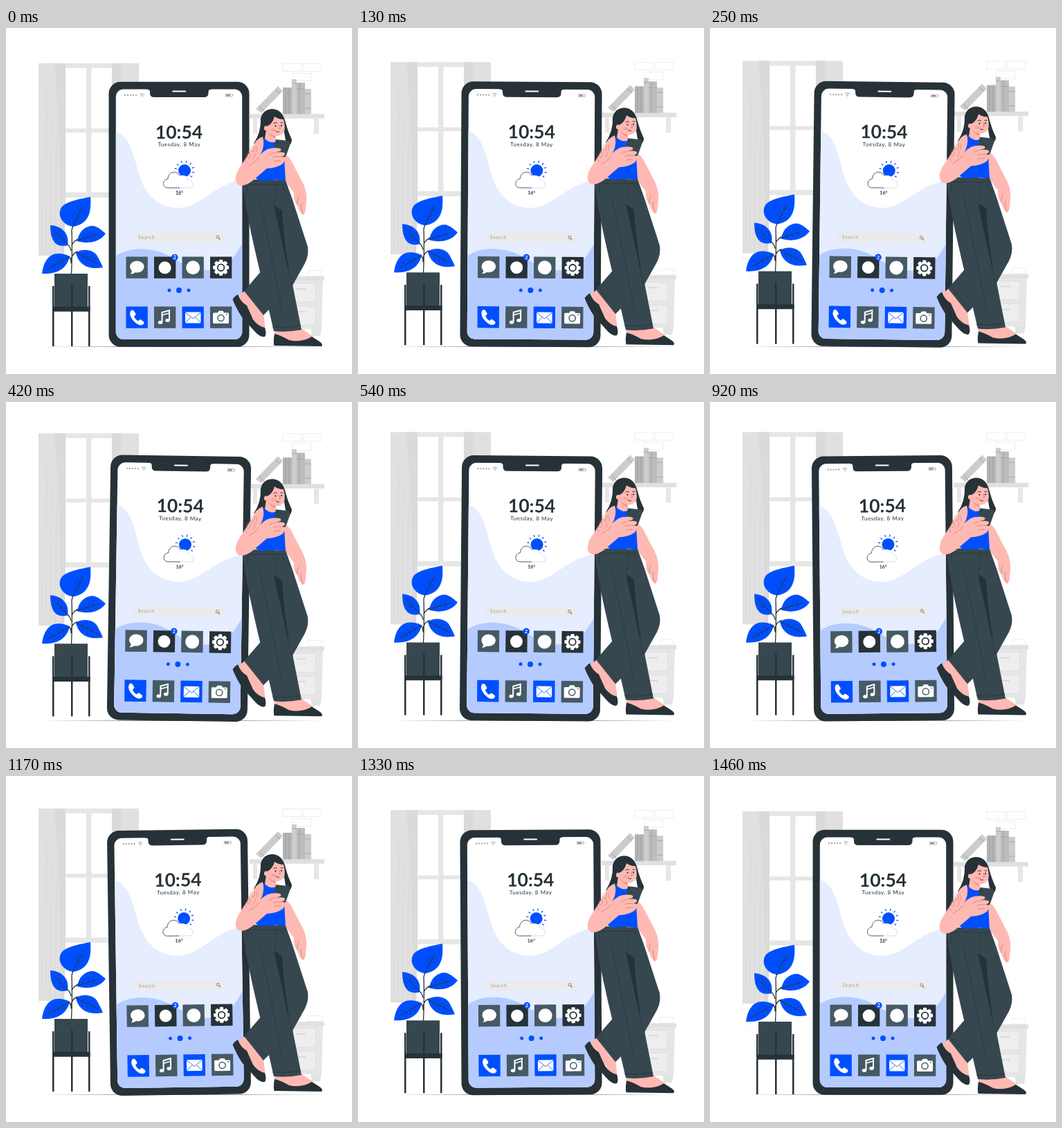
An HTML page with a canvas for the animation above (1500 ms loop, 500 px wide and 500 px high).

```html
<!DOCTYPE html>
<html lang="en">
<head>
<meta charset="utf-8">
<title>Leaning on a phone</title>
<style>
html, body { margin: 0; width: 100%; height: 100%; overflow: hidden; background: #fff; }
canvas { display: block; width: 500px; height: 500px; }
</style>
</head>
<body>
<canvas id="stage" width="500" height="500"></canvas>
<script>
const ctx = document.getElementById('stage').getContext('2d');
const INK = '#263238', SLATE = '#37474f', STEEL = '#455a64', BLUE = '#004fff', SKIN = '#ffb9b3', RED = '#b86b66';

function fill(color, d) {
  ctx.fillStyle = color;
  ctx.fill(new Path2D(d));
}
function line(color, width, d) {
  ctx.strokeStyle = color;
  ctx.lineWidth = width;
  ctx.stroke(new Path2D(d));
}
function box(color, x, y, w, h, r = 0) {
  ctx.fillStyle = color;
  ctx.beginPath();
  ctx.roundRect(x, y, w, h, r);
  ctx.fill();
}
function frame(color, width, x, y, w, h) {
  ctx.strokeStyle = color;
  ctx.lineWidth = width;
  ctx.strokeRect(x, y, w, h);
}
function disc(color, x, y, r, ry = r) {
  ctx.fillStyle = color;
  ctx.beginPath();
  ctx.ellipse(x, y, r, ry, 0, 0, 7);
  ctx.fill();
}
function ring(color, width, x, y, r) {
  ctx.strokeStyle = color;
  ctx.lineWidth = width;
  ctx.beginPath();
  ctx.arc(x, y, r, 0, 7);
  ctx.stroke();
}
function label(text, x, y, font, color, spacing = 0, align = 'left') {
  ctx.font = font + ' Lato, sans-serif';
  ctx.fillStyle = color;
  ctx.letterSpacing = spacing + 'px';
  ctx.textAlign = align;
  ctx.fillText(text, x, y);
  ctx.letterSpacing = '0px';
}
function shifted(dy, draw) {
  ctx.save();
  ctx.translate(0, dy);
  draw();
  ctx.restore();
}

function drawWindow() {
  box('#e6e6e6', 86, 51, 68, 7);
  box('#e6e6e6', 116, 51, 7.5, 192);
  box('#e6e6e6', 84, 145.3, 70, 5.7);
  box('#e6e6e6', 84, 237.5, 70, 7.5);
  fill('#e0e0e0', 'M47 51H86V240L84 329H47Z');
  fill('#dadada', 'M70 51H86V240L84 329H79Q80 180 70 51Z');
  box('#e0e0e0', 153, 51, 39, 180);
  fill('#dadada', 'M153 51H167Q165 140 158 230H153Z');
  line('#d0d0d0', .5, 'M54 160L52 328M60 90L57 328M66 130L64 328M73 150L71 328');
  frame('#eeeeee', .7, 57, 354, 25, 8);
}

function drawShelf() {
  for (const [x, y] of [[400, 51.5], [429, 51.5], [414, 65.5]]) frame('#e6e6e6', .7, x, y, 27, 11);
  box('#e6e6e6', 357, 131, 6, 22);
  box('#e6e6e6', 445, 131, 7, 22);
  box('#e0e0e0', 352, 124.3, 108, 6.5);
  fill('#cccccc', 'M361 117L393 84L400 91L369 123Z');
  line('#b0b0b0', 1.2, 'M366 113L373 120M389 89L396 95');
  box('#b3b3b3', 400, 86, 13, 38.5);
  box('#cccccc', 413, 74, 7, 50.5);
  box('#bdbdbd', 420, 79, 12, 45.5);
  box('#cccccc', 432, 88, 9, 36.5);
  line('#a0a0a0', .8, 'M404 86V124M409 86V124M413 80H420M424 79V124M420 88H432M432 95H441M432 116H441');
}

function drawCabinet() {
  frame('#e6e6e6', .7, 437, 350.5, 19, 8);
  fill('#e3e3e3', 'M440 433H456L454 445H442Z');
  fill('#e6e6e6', 'M385 364H458L456 435H385Z');
  box('#e0e0e0', 383, 359, 77, 6);
  for (const y of [369, 402]) {
    fill('#eeeeee', `M404 ${y}H448L447 ${y + 27}H404Z`);
    line('#d8d8d8', .7, `M404 ${y}H448L447 ${y + 27}H404`);
    line('#d0d0d0', 1.3, `M420 ${y + 8}H433`);
  }
}

// Outline plus a midrib from base to tip, with short forward-leaning veins
function leaf(outline, x0, y0, x1, y1) {
  fill(BLUE, outline);
  ctx.save();
  ctx.translate(x0, y0);
  ctx.rotate(Math.atan2(y1 - y0, x1 - x0));
  const len = Math.hypot(x1 - x0, y1 - y0);
  line(INK, .8, `M-2 0H${len * .9}`);
  let veins = '';
  for (let x = len * .2; x < len * .7; x += len * .2) veins += `M${x + 6} -7L${x} 0L${x + 6} 7`;
  line(INK, .35, veins);
  ctx.restore();
}

function drawPlant() {
  line(INK, 1.3, 'M94.5 356Q96 322 95 292L97 285M95 314Q98 307 106 304M94 322Q93 316 88 312M94 334Q96 325 104 323M94 340Q95 330 86 330');
  leaf('M97 287C78 284 73 266 82 257C92 249 108 247 122 244C123 258 124 283 97 287Z', 97, 286, 113, 254);
  leaf('M103 308C105 293 116 285 127 286C134 288 139 293 144 297C138 306 124 314 103 308Z', 103, 307, 138, 296);
  leaf('M89 314C72 318 64 308 64 285C80 286 92 296 89 314Z', 89, 313, 67, 290);
  leaf('M101 325C108 319 124 319 131 328C135 335 138 341 140 346C124 349 106 346 101 325Z', 102, 325, 137, 343);
  leaf('M52 355C54 338 62 326 75 326C83 326 88 328 92 330C88 348 74 356 52 355Z', 91, 331, 56, 351);
  box(SLATE, 70, 355, 48, 49);
  box(INK, 67, 402.7, 54.5, 7);
  box(INK, 67, 373, 2.5, 87);
  box(INK, 94, 371, 2.5, 89);
  box(INK, 119, 373, 2.5, 87);
}

function drawWeather() {
  disc(BLUE, 258, 206, 9);
  for (let i = 0; i < 12; i++) {
    const a = i * Math.PI / 6 + .2, c = Math.cos(a), s = Math.sin(a);
    line(BLUE, 1.3, `M${258 + 11.5 * c} ${206 + 11.5 * s}L${258 + 14.5 * c} ${206 + 14.5 * s}`);
  }
  fill('#fff', 'M233 231C225 230 226 219 234 218C234 207 248 205 251 214C258 211 263 215 263 220C272 220 273 231 265 231Z');
  line(INK, .8, 'M251 231H233C225 230 226 219 234 218C234 207 248 205 251 214');
  line('#b0b8bc', .5, 'M252 231H265C273 231 272 222 266 220.5');
  label('16°', 250.5, 240.5, '700 7px', INK, 0, 'center');
}

function drawStatus() {
  for (let i = 0; i < 5; i++) disc('#a5a9ab', 172 + i * 4, 97, 1.2);
  line('#a5a9ab', 1, 'M193 96Q196.5 93 200 96M194.7 97.7Q196.5 96 198.3 97.7');
  disc('#a5a9ab', 196.5, 99, .8);
  frame('#a5a9ab', .7, 317.5, 95.2, 9.5, 4);
  box('#8b9194', 318.3, 96, 6, 2.4);
  box('#a5a9ab', 327.3, 96.3, 1, 1.8);
}

function drawGear(x, y) {
  ctx.save();
  ctx.translate(x, y);
  for (let i = 0; i < 8; i++) {
    box('#fff', -2.6, -11.5, 5.2, 8, 1);
    ctx.rotate(Math.PI / 4);
  }
  disc('#fff', 0, 0, 9.2);
  ring(INK, 1.8, 0, 0, 4.8);
  ctx.restore();
}

function drawIcons() {
  const columns = [173.5, 214, 254.5, 295];
  const rows = [[330.5, [STEEL, INK, STEEL, INK]], [402.5, [BLUE, STEEL, BLUE, STEEL]]];
  for (const [y, colors] of rows) columns.forEach((x, i) => box(colors[i], x, y, 31.3, 31.3));

  disc('#fff', 189.3, 345, 10.3, 8.6);
  fill('#fff', 'M181 347Q183 353 179.5 355.5Q185 355.5 188 352Z');
  disc('#fff', 229.6, 346.3, 9);
  disc(BLUE, 243.7, 331.5, 4.8);
  label('2', 243.7, 334, '700 7px', '#fff', 0, 'center');
  disc('#fff', 270.2, 346.2, 10);
  drawGear(310.6, 346.2);

  fill('#fff', 'M180 409Q183 406 185 409L187.5 413Q188 415 185 416.5Q187 421.5 191 423.5Q193 420.5 195 421.5L199 424.5Q200.5 427 197 429Q192 431 185 424Q177 416 180 409Z');
  line('#fff', 2, 'M225.5 425V411L236 408V422');
  line('#fff', 1.6, 'M225.5 415L236 412');
  disc('#fff', 223, 425.5, 3.3, 2.5);
  disc('#fff', 233.5, 422.5, 3.3, 2.5);
  box('#fff', 259, 410.5, 22.5, 16, 1);
  line(BLUE, .8, 'M259 411L270.2 420L281.5 411M259 426L267 418M281.5 426L273.5 418');
  box('#fff', 299, 411.5, 23, 15.5, 1.5);
  fill('#fff', 'M305.5 412L307.5 408.8H313.5L315.5 412Z');
  ring(STEEL, 1.5, 310.5, 419, 4.6);
  box(STEEL, 318, 413.3, 2, 1.2);
}

function drawPhone(degrees) {
  ctx.save();
  ctx.translate(250, 269.5);
  ctx.rotate(degrees * Math.PI / 180);
  ctx.translate(-250, -269.5);
  box(INK, 148.5, 77.8, 203, 383, 17);

  ctx.save();
  ctx.beginPath();
  ctx.roundRect(158.8, 88.5, 182.4, 361.5, 11);
  ctx.clip();
  box('#fff', 158, 88, 184, 363);
  fill('#e5edff', 'M158 150C176 152 184 180 190 204C199 239 217 259 249 260C282 259 300 226 342 219V451H158Z');
  fill('#b5cbff', 'M158 330C176 317 205 316 229 326C248 334 262 350 292 350C318 350 330 332 342 310V451H158Z');
  ctx.restore();

  fill(INK, 'M203 86V88.5Q208 88.5 208 92V94Q208 100 214 100H286Q292.5 100 292.5 94V92Q292.5 88.5 297 88.5V86Z');
  line('#fff', 2, 'M240.5 91.5H260');
  drawStatus();
  label('10:54', 250, 159.5, '700 26.5px', INK, 0, 'center');
  label('Tuesday, 8 May', 250.3, 171, '400 8px', INK, .55, 'center');
  drawWeather();
  box('#ebebeb', 184.5, 296, 130.5, 13.5, 1);
  label('Search', 191, 305, '400 7px', '#a0a0a0', .6);
  ring('#777', .9, 305.8, 302, 2);
  line('#777', 1.2, 'M307.3 303.6L309.5 306');
  drawIcons();
  disc(BLUE, 236, 379, 2.5);
  disc(BLUE, 250, 379, 4);
  disc(BLUE, 264, 379, 2.5);
  ctx.restore();
}

function drawLegs() {
  fill(SKIN, 'M335 388L346 379L372 412L375 438L361 426Z');
  fill(INK, 'M335 385Q331 387 327.5 392Q332 404 341 418L359 438Q368 448 374 446Q377 442 374 433Q364 431 357 421Q351 408 348 401Q339 396 335 385Z');
  fill(SLATE, 'M380 220H404L414 248L436 316Q438 328 432 340L413 374L372 415L344 380L370 350Z');
  line(INK, .6, 'M348 377L376 411');

  fill(SKIN, 'M388 434L425 433L444 446L425 454L388 449Z');
  fill(INK, 'M388 442Q386 452 387.5 459L456 460Q459 457 453 453L442 446Q427 455 409 451Q397 444 388 442Z');
  fill(SLATE, 'M341 219H388L389 258L410 350L427 436Q407 440 387 438L370 365C360 322 347 270 341 219Z');
  fill(INK, 'M387 256L399 264Q401 302 411 366Z');
  line(INK, .7, 'M342 226H405M386 226Q394 238 390 249L386 250M411 366L414 374M366 246Q379 304 399 410M385 432Q406 434 426 430M348 228Q352 238 345 242M399 228Q402 238 410 241');
}

function drawHead() {
  fill(INK, 'M384 117Q371 118 368 131Q369 150 358 167Q367 168 375 164L386 156L402 150Q403 160 406 168Q413 170 413 161Q407 149 403 133Q398 117 384 117Z');
  fill(SKIN, 'M376 147L374 160Q381 168 391 164L389 154Z');
  fill('#ed928b', 'M379 150Q383 158 390 159L389 154Z');
  fill(SKIN, 'M377 142Q385 139 388 128Q394 132 401 132Q404 143 402 150Q397 157 389 156Q381 154 378 148Q372 149 373 144Q374 140 377 142Z');
  disc('#ff9f9a', 386, 147, 3, 2.2);
  disc(INK, 389.5, 141.5, 1, 1.3);
  disc(INK, 398, 141, 1, 1.3);
  line(INK, .9, 'M386.5 138Q389 135.5 392 137.5M396.5 136.8L400.5 137');
  line(RED, .8, 'M394.5 140L396.5 145.5L394 146');
  line(INK, .9, 'M389.5 148Q391.5 151.5 395 150');
}

function drawWoman() {
  fill(SKIN, 'M399 181Q409 183 416 199L430 226Q436 240 433.5 255Q433 270 429 270Q424 267 421 256Q415 250 416 238L401 218Z');
  line(RED, .6, 'M421 256Q420 247 424 243M429 268Q425 258 427 253');
  drawLegs();
  fill(BLUE, 'M372 157Q375 163 382 164L389 160Q397 171 402 187L404 221Q386 218 368 221L358 216L366 177Z');
  drawHead();

  fill(SKIN, 'M371 157Q361 160 356 173L335 206Q328 221 336 227Q344 230 356 221L377 203Q392 202 400 196Q405 190 403 183L405 177Q403 172 393 174L380 174Q373 177 368 184L363 190Q376 181 374 169Z');
  fill(BLUE, 'M371 157Q374 167 370 178L366 186L382 180V165Q375 163 371 157Z');
  fill(SLATE, 'M390 161L408 163Q411 164 411 167L405 184Q404 187 401 187L390 184Q386 181 387 177Z');
  disc(INK, 392, 165, 1.2);
  fill(SKIN, 'M363 188Q369 180 378 175Q388 172 396 174Q399 176 396 178L389 180Q400 178 403 181Q404 184 398 186Q404 186 403 189Q401 192 397 192Q402 194 398 197Q389 202 377 202L364 212Z');
  line(RED, .6, 'M389 180Q383 181 380 184M398 186Q390 185 386 187M397 192Q391 191 387 193M366 187Q359 195 351 199');
  line(RED, .5, 'M356 170Q350 175 356 179Q362 177 358 171M351 178Q346 184 350 189Q356 187 351 178M358 180Q363 185 356 190M347 187Q344 193 349 195M361 170Q364 175 362 179');
}

const FPS = 24, CYCLE = 35, LOOP = 1500;

function draw(ms) {
  const step = Math.floor((ms % LOOP) * FPS / 1000 + .1);
  const phase = (step / CYCLE) % 1;
  const lift = -10 * (1 - Math.abs(1 - 2 * phase));
  const tilt = phase < .25 ? phase * 4 : phase < .75 ? 2 - phase * 4 : phase * 4 - 4;

  box('#fff', 0, 0, 500, 500);
  shifted(lift, () => {
    drawWindow();
    drawShelf();
    drawCabinet();
  });
  fill(INK, 'M47 460.3L250 459.9L458 460.3L250 460.7Z');
  shifted(lift, drawPlant);
  drawPhone(tilt);
  shifted(lift, drawWoman);
}

const start = performance.now();
function tick() {
  draw(performance.now() - start);
  requestAnimationFrame(tick);
}
tick();
</script>
</body>
</html>
```
